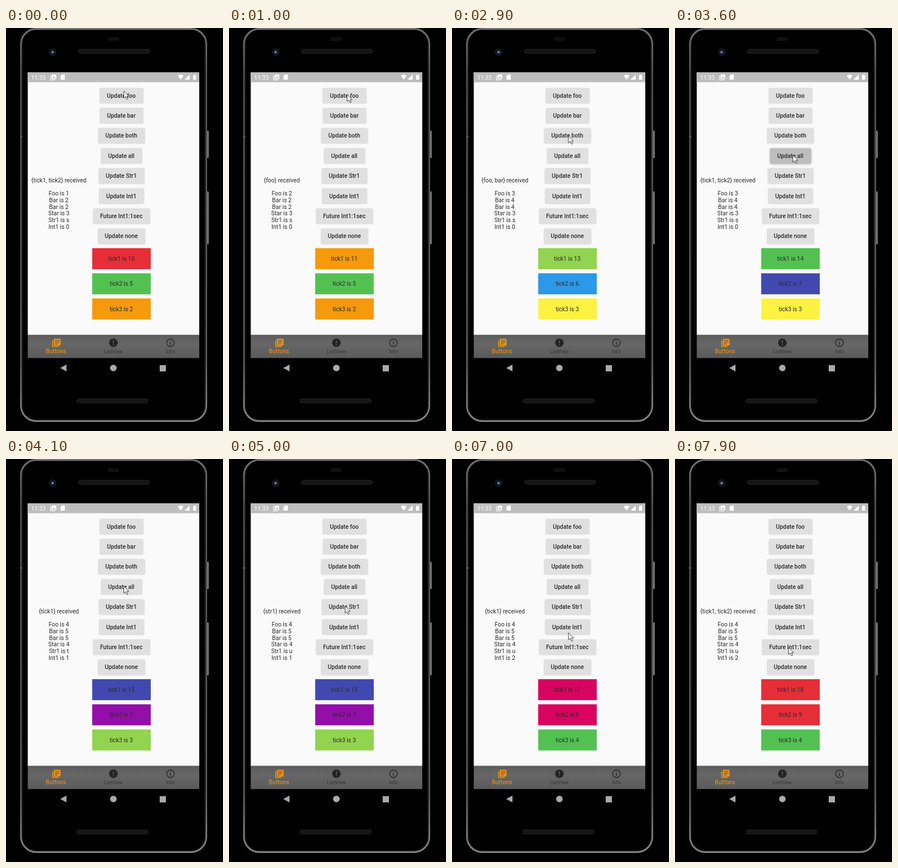
Recreate the animation shown at these times as an HTML page. Size 384 by 710 pixels, loop 8 s.

```html
<!DOCTYPE html>
<html lang="en">
<head>
<meta charset="utf-8">
<title>Phone demo</title>
<style>
  html, body { margin: 0; width: 100%; height: 100%; overflow: hidden; background: #000; }
  svg { display: block; width: 100%; height: 100%; }
  text { font: 10.35px Roboto, sans-serif; fill: #2b2b2b; text-anchor: middle; }
  .label { font-weight: 500; }
  .raised { fill: #e0e0e0; filter: drop-shadow(0 .7px .8px rgba(0, 0, 0, .2)); }
  .pressed { fill: #bebebe; filter: drop-shadow(0 1.5px 2px rgba(0, 0, 0, .25)); }
</style>
</head>
<body>
<svg id="stage" viewBox="0 0 384 710">
  <defs>
    <linearGradient id="rim" x2="0" y2="1">
      <stop stop-color="#727272"/><stop offset=".12" stop-color="#4c4c4c"/>
      <stop offset=".85" stop-color="#555"/><stop offset="1" stop-color="#858585"/>
    </linearGradient>
    <linearGradient id="bar" x2="0" y2="1">
      <stop stop-color="#5d5d5d"/><stop offset=".4" stop-color="#666"/><stop offset="1" stop-color="#5b5b5b"/>
    </linearGradient>
    <linearGradient id="key">
      <stop stop-color="#444"/><stop offset=".6" stop-color="#858585"/><stop offset="1" stop-color="#555"/>
    </linearGradient>
  </defs>

  <!-- Phone body -->
  <g fill="url(#key)">
    <rect x="354" y="181" width="5" height="48" rx="1.5"/>
    <rect x="354" y="288" width="5" height="93" rx="1.5"/>
  </g>
  <rect x="26.500" y="1.500" width="328" height="691" rx="27" fill="#000" stroke="url(#rim)" stroke-width="3"/>
  <rect x="29.500" y="3.500" width="322" height="686" rx="24" fill="#000" stroke="#1e1e1e"/>
  <path d="M25 192h4" stroke="#888"/>
  <g fill="#141414" stroke="#262626">
    <rect x="128" y="37.500" width="126" height="7" rx="3.500"/>
    <rect x="125.500" y="653.500" width="126" height="7" rx="3.500"/>
  </g>
  <rect x="180" y="16" width="20" height="7" rx="3" fill="#101010"/>
  <circle cx="82.500" cy="42.500" r="6" fill="#11131a" stroke="#202024"/>
  <circle cx="82.500" cy="42.500" r="2.800" fill="#3b4578"/>
  <circle cx="82.500" cy="42.500" r="1.300" fill="#98a0d0"/>

  <!-- Screen -->
  <rect x="38.500" y="78" width="303.500" height="463" fill="#fafafa"/>
  <rect x="38.500" y="78" width="303.500" height="17.500" fill="#bdbdbd"/>
  <g fill="#fff">
    <text x="57.500" y="90.500" style="fill:#fff">11:33</text>
    <path d="M78.500 83.500V91.500H87" fill="none" stroke="#fff"/>
    <rect x="80.500" y="82" width="8.500" height="8" rx="1"/>
    <path d="M82 88.500L84 85.500L85.500 87L86.500 86L88 88.500Z" fill="#bdbdbd"/>
    <path d="M99 82H104V91H96.500V84.500Z"/>
    <path d="M304 84Q309 80 314 84L309 91Z"/>
    <path d="M325 82V91H316Z"/>
    <path d="M331 83H332.500V82H335V83H336.500V91H331Z"/>
  </g>

  <!-- Tab bar -->
  <rect x="38.500" y="540.500" width="303.500" height="41" fill="url(#bar)"/>
  <g fill="#f89406">
    <path d="M82.500 550.500V561H93" fill="none" stroke="#f89406" stroke-width="1.500"/>
    <rect x="84.500" y="547.500" width="12" height="12" rx="1.500"/>
    <path d="M86.500 550.500h8M86.500 553.500h8M86.500 556.500h5" stroke="#606060" stroke-width="1.300"/>
    <text x="88.500" y="573" style="fill:#f89406">Buttons</text>
  </g>
  <circle cx="190" cy="554.500" r="6.500" fill="#222" stroke="#222" stroke-width="2.600" stroke-dasharray="2.500 1"/>
  <path d="M190 550.500v5M190 557v1.500" stroke="#666" stroke-width="1.600"/>
  <circle cx="291" cy="554.500" r="6.700" fill="none" stroke="#262626" stroke-width="1.400"/>
  <path d="M291 551v1.500M291 553.700v4.500" stroke="#262626" stroke-width="1.500"/>
  <text x="190" y="573.300" style="font-size:8.870px;fill:#363636">ListView</text>
  <text x="291" y="573.300" style="font-size:8.870px;fill:#363636">Info</text>

  <!-- System keys -->
  <g fill="#aaa">
    <path d="M96 599L107 593V605Z"/>
    <circle cx="190" cy="599" r="5.800"/>
    <rect x="272" y="594" width="11" height="11"/>
  </g>

  <g id="app"></g>
  <path id="cursor" d="M0 0V12.500L3 9.800L5.200 14.700L7.300 13.700L5.200 9.200H9Z" fill="#fff" stroke="#333" stroke-width=".9"/>
</svg>

<script>
const LOOP = 8000;
const PALETTE = ['#e52e37', '#f6990c', '#fdf142', '#92d350', '#52c152',
                 '#2c98ea', '#4149b0', '#920fa8', '#d8045f'];
const TICKS = ['tick1', 'tick2', 'tick3'];
const ALL = ['foo', 'bar', 'star', 'str1', 'int1'];
const START = { foo: 1, bar: 2, star: 3, str1: 0, int1: 0, tick1: 10, tick2: 5, tick3: 2 };

// Label and width, from top to bottom
const BUTTONS = [['Update foo', 77], ['Update bar', 76], ['Update both', 82], ['Update all', 72],
                 ['Update Str1', 80], ['Update Int1', 79], ['Future Int1:1sec', 100], ['Update none', 83]];

const CLICKS = [
  { button: 0, down: 500, up: 600, keys: ['foo'] },
  { button: 1, down: 1400, up: 1500, keys: ['bar'] },
  { button: 2, down: 2200, up: 2300, keys: ['foo', 'bar'] },
  { button: 3, down: 3500, up: 3700, keys: ALL },
  { button: 4, down: 4550, up: 4650, keys: ['str1'] },
  { button: 5, down: 5700, up: 5900, keys: ['int1'] },
];

// Cursor moves: start, end, x, y
const MOVES = [[0, 0, 208.5, 111], [400, 500, 209, 117], [1000, 1200, 206, 153], [1800, 2000, 206, 190],
               [2900, 3200, 208.5, 224], [4200, 4500, 205.5, 259], [5100, 5400, 209, 292],
               [6800, 7300, 201, 332]];

// tick1 fires every second, tick2 every second beat, tick3 every fourth
const events = CLICKS.map(({ up, keys }) => ({ time: up, keys }));
for (let n = 11; n <= 18; n++) {
  const keys = TICKS.filter((_, i) => (n - 12) % 2 ** i === 0);
  events.push({ time: 100 + (n - 11) * 1000, keys });
}
events.sort((a, b) => a.time - b.time);

const clamp = v => Math.max(0, Math.min(1, v));
const ease = v => v * v * (3 - 2 * v);
const app = document.getElementById('app');
const cursor = document.getElementById('cursor');

function add(tag, attrs, content = '') {
  const node = document.createElementNS('http://www.w3.org/2000/svg', tag);
  for (const name in attrs) node.setAttribute(name, attrs[name]);
  node.textContent = content;
  return app.appendChild(node);
}

const addText = (x, middle, content, attrs = {}) => add('text', { x, y: middle + 3.6, ...attrs }, content);

const overlays = BUTTONS.map(([label, width], i) => {
  const middle = 119.2 + i * 35.42;
  const box = { x: 204.5 - width / 2, y: middle - 13.3, width, height: 26.6, rx: 1.5 };
  add('rect', { ...box, class: 'raised' });
  const overlay = add('rect', { ...box, class: 'pressed', opacity: 0 });
  addText(204, middle - 0.3, label, { class: 'label' });
  return overlay;
});

const tiles = TICKS.map((_, i) => {
  const y = 387.9 + i * 44.3;
  return {
    box: add('rect', { x: 152.5, y, width: 103.7, height: 37 }),
    text: addText(204, y + 18.5, ''),
  };
});

const lines = Array.from({ length: 8 }, (_, i) => addText(93.5, 268.2 + i * 11.68, ''));

function replay(t) {
  const values = { ...START };
  const colors = [0, 4, 1];
  let latest = ['tick1', 'tick2'];
  for (const { time, keys } of events) {
    if (time > t) break;
    keys.forEach(key => values[key]++);
    // Updating everything also rebuilds, and so recolours, each tile
    TICKS.forEach((key, i) => { if (keys === ALL || keys.includes(key)) colors[i]++; });
    latest = keys;
  }
  return { values, colors, latest };
}

function cursorAt(t) {
  let [, , x, y] = MOVES[0];
  for (const [start, end, toX, toY] of MOVES.slice(1)) {
    const p = ease(clamp((t - start) / (end - start)));
    x += (toX - x) * p;
    y += (toY - y) * p;
  }
  return [x, y];
}

function draw(t) {
  const { values, colors, latest } = replay(t);
  const set = `{${latest.join(', ')}}`;
  const message = latest.length > 2 ? [set, 'received'] : [`${set} received`, ''];
  const content = [...message, `Foo is ${values.foo}`, `Bar is ${values.bar}`, `Bar is ${values.bar}`,
    `Star is ${values.star}`, `Str1 is ${'stuv'[values.str1]}`, `Int1 is ${values.int1}`];
  lines.forEach((line, i) => { line.textContent = content[i]; });

  tiles.forEach(({ box, text }, i) => {
    box.setAttribute('fill', PALETTE[colors[i] % PALETTE.length]);
    text.textContent = `${TICKS[i]} is ${values[TICKS[i]]}`;
  });

  for (const { button, down, up } of CLICKS) {
    const level = clamp((t - down) / 100) * clamp((up + 350 - t) / 250);
    overlays[button].setAttribute('opacity', level);
  }
  cursor.setAttribute('transform', `translate(${cursorAt(t)})`);
}

const begin = performance.now();
function frame() {
  draw((performance.now() - begin) % LOOP);
  requestAnimationFrame(frame);
}
frame();
</script>
</body>
</html>
```
